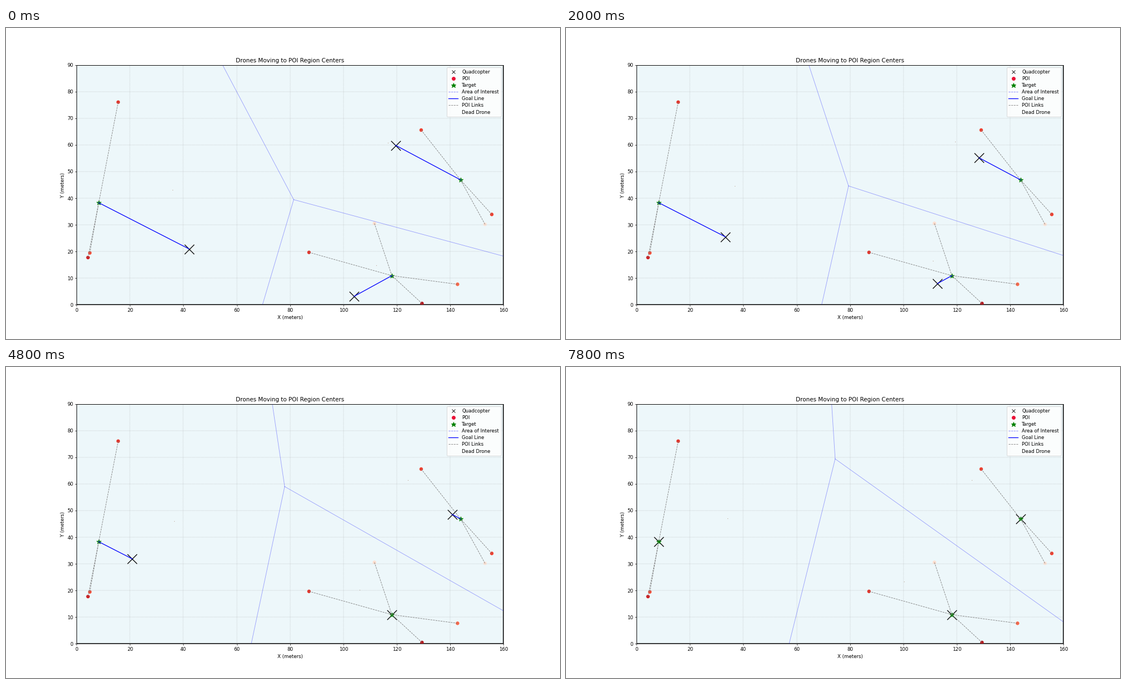
A matplotlib script that plays this animation: 998 by 561 pixels, repeating every 8 s.

```python
import numpy as np
import matplotlib.pyplot as plt
from matplotlib.animation import FuncAnimation
from matplotlib.lines import Line2D
from matplotlib.patches import Rectangle

W, H = 160, 90
FRAMES, INTERVAL = 40, 200
SPEED = 1.0  # metres per frame

starts = np.array([(42.2, 20.92), (119.56, 59.87), (103.99, 3.14)])
targets = np.array([(8.28, 38.3), (143.9, 46.9), (118.18, 10.93)])

# x, y, priority for the points of interest of each target
groups = [
    [(15.57, 76.07, .66), (4.94, 19.47, .58), (4.24, 17.72, .74)],
    [(129.17, 65.58, .62), (155.64, 33.91, .62), (153.1, 30.21, .10)],
    [(111.64, 30.56, .13), (87.11, 19.67, .66), (142.8, 7.68, .51), (129.47, 0.49, .82)],
]


def drone_positions(k):
    gap = targets - starts
    dist = np.hypot(*gap.T)
    return starts + gap * (np.minimum(k * SPEED, dist) / dist)[:, None]


def clip_half(poly, mid, normal):
    """Keep the part of poly where (p - mid) . normal <= 0."""
    out = []
    for a, b in zip(poly, poly[1:] + poly[:1]):
        da, db = (a - mid) @ normal, (b - mid) @ normal
        if da <= 0:
            out.append(a)
        if da * db < 0:
            out.append(a + (b - a) * da / (da - db))
    return out


def cell(i, pts):
    poly = [np.array(c, float) for c in ((0, 0), (W, 0), (W, H), (0, H))]
    for j, q in enumerate(pts):
        if j != i:
            poly = clip_half(poly, (pts[i] + q) / 2, q - pts[i])
    return np.array(poly)


def centroid(poly):
    nxt = np.roll(poly, -1, axis=0)
    cross = poly[:, 0] * nxt[:, 1] - nxt[:, 0] * poly[:, 1]
    return ((poly + nxt) * cross[:, None]).sum(0) / (3 * cross.sum())


def circumcenter(a, b, c):
    rows = 2 * np.array([b - a, c - a])
    return np.linalg.solve(rows, [b @ b - a @ a, c @ c - a @ a])


def border_ray(pts, k):
    """Voronoi border between the two drones other than k."""
    a, b = np.delete(pts, k, axis=0)
    center = circumcenter(*pts)
    d = np.array([a[1] - b[1], b[0] - a[0]])
    if d @ (pts[k] - a) > 0:
        d = -d
    return np.array([center, center + d / np.hypot(*d) * 300])


# 998 x 561 pixels; the margins are those of a full 16 x 9 inch page
fig = plt.figure(figsize=(15.994, 8.9905), dpi=62.4)
kx, ky = 16 / 15.994, 9 / 8.9905
fig.subplots_adjust(left=0.125 * kx, right=0.9 * kx, bottom=0.11 * ky, top=0.88 * ky)
ax = fig.add_subplot()
ax.set_aspect("equal")
ax.set(xlim=(0, W), ylim=(0, H), xlabel="X (meters)", ylabel="Y (meters)",
       title="Drones Moving to POI Region Centers", facecolor="#edf7fa")
ax.grid(True, linestyle="--", linewidth=0.5, color="gray", alpha=0.5)
ax.add_patch(Rectangle((0, 0), W, H, fill=False, edgecolor="black", linewidth=2))

borders = [ax.plot([], [], color="blue", alpha=0.36, lw=1)[0] for _ in starts]
for target, group in zip(targets, groups):
    x, y, priority = np.array(group).T
    ax.scatter(x, y, s=40, c=priority, cmap="Reds", vmin=0, vmax=1)
    for px, py in zip(x, y):
        ax.plot([px, target[0]], [py, target[1]], "--", color="gray", lw=1)

drones = ax.scatter(*starts.T, s=400, marker="x", color="black")
ax.scatter(*targets.T, s=100, marker="*", color="green")
goals = [ax.plot([], [], color="blue", lw=1.5)[0] for _ in starts]
centers = ax.scatter(*starts.T, s=1.8, color="#b89a88", linewidths=0)


def marker_key(shape, color, size, label):
    return Line2D([], [], linestyle="None", marker=shape, color=color,
                  markersize=size, label=label)


ax.legend(loc="upper right", labelspacing=0.364, handles=[
    marker_key("x", "black", 8, "Quadcopter"),
    marker_key("o", "#ea1236", 7, "POI"),
    marker_key("*", "green", 10, "Target"),
    Line2D([], [], color="blue", ls="--", lw=1, alpha=0.5, label="Area of Interest"),
    Line2D([], [], color="blue", lw=1.5, label="Goal Line"),
    Line2D([], [], color="gray", ls="--", lw=1, label="POI Links"),
    marker_key("None", "none", 8, "Dead Drone"),
])


def update(k):
    pts = drone_positions(k)
    last = drone_positions(k - 1)  # regions trail the drones by one step
    drones.set_offsets(pts)
    centers.set_offsets([centroid(cell(i, last)) for i in range(len(last))])
    for i, (p, t) in enumerate(zip(pts, targets)):
        borders[i].set_data(*border_ray(last, i).T)
        moving = np.hypot(*(t - p)) > 1e-6
        goals[i].set_data(*(np.array([p, t]).T if moving else ([], [])))
    return [drones, centers, *borders, *goals]


anim = FuncAnimation(fig, update, frames=FRAMES, interval=INTERVAL,
                     init_func=lambda: update(0), repeat=True, repeat_delay=0)
plt.show()
```
